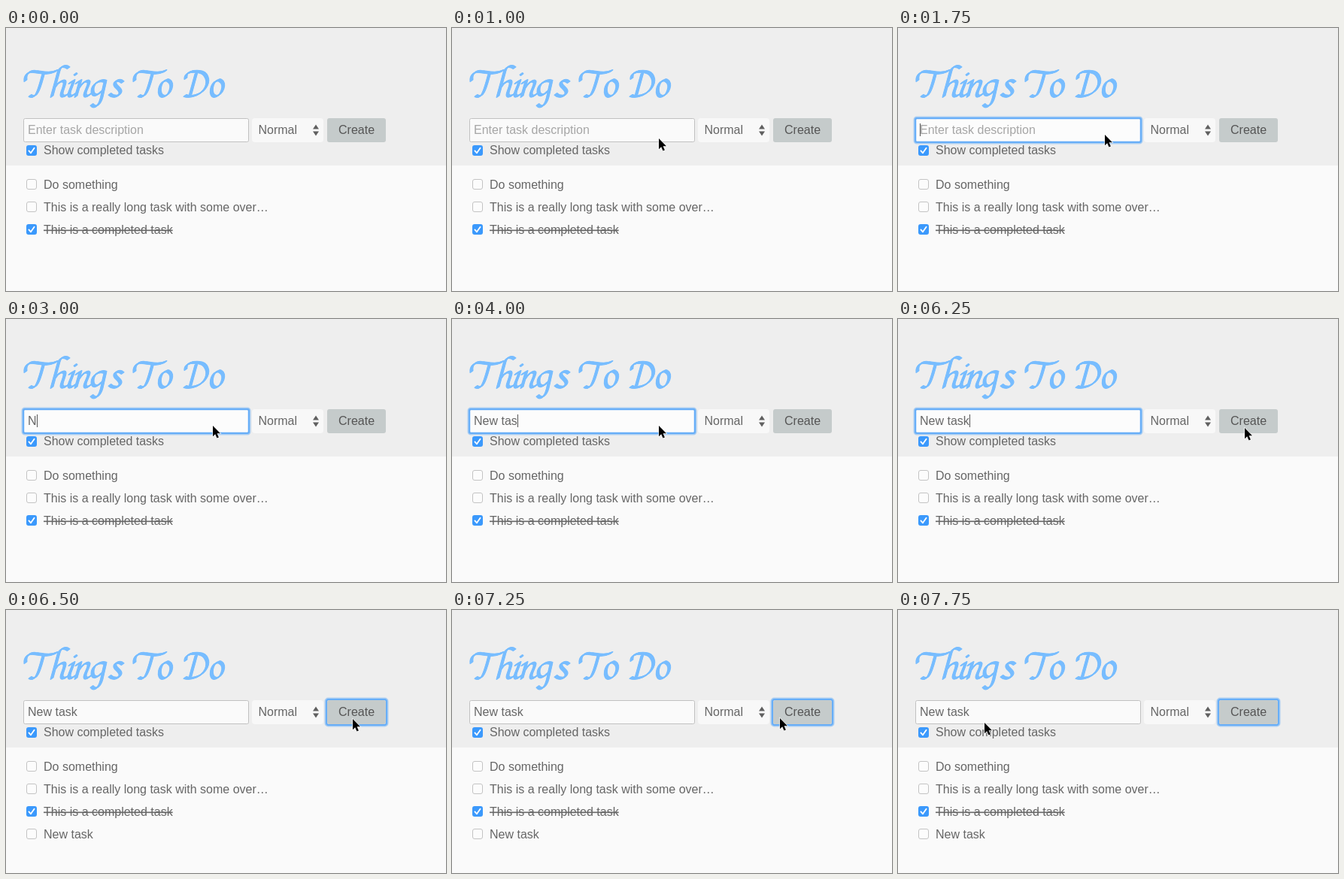
Animation, 585 px wide and 350 px high, one loop 8 s. Source, as an HTML page:

```html
<!DOCTYPE html>
<html lang="en">
<head>
<meta charset="utf-8">
<title>Things To Do</title>
<style>
  html, body { margin: 0; width: 100%; height: 100%; overflow: hidden; background: #fafafa; }
  svg { display: block; }
  text { font: 16px "Liberation Sans", Arial, sans-serif; fill: #666; white-space: pre; }
  .hint { fill: #a6a6a6; }
  .done { text-decoration: line-through; }
  .nib { fill: none; stroke: #78bdff; stroke-width: 1.4; stroke-linecap: round; stroke-linejoin: round; }
  .ring { fill: none; stroke: #67aef8; }
</style>
</head>
<body>
<svg id="stage" width="585" height="350" viewBox="0 0 585 350">
  <defs>
    <g id="box"><rect x=".5" y=".5" width="13" height="13" rx="2.5" fill="#fcfcfc" stroke="#c3c3c3"/></g>
    <g id="tick">
      <rect width="14" height="14" rx="3" fill="#3b99fc"/>
      <path d="M3.4 7.4 L6 10.3 L10.6 3.8" fill="none" stroke="#fff" stroke-width="1.8" stroke-linecap="round" stroke-linejoin="round"/>
    </g>
  </defs>
  <rect width="585" height="350" fill="#fafafa"/>
  <rect width="585" height="183" fill="#eee"/>
  <g id="heading" role="img" aria-label="Things To Do"></g>

  <rect id="field" x="23.5" y="120.5" width="299" height="31" rx="2" fill="#fafafa" stroke="#c1c1c1"/>
  <g id="fieldRing" class="ring">
    <rect x="22.5" y="119.5" width="301" height="33" rx="2.5" stroke-width="4" opacity=".5"/>
    <rect x="23" y="120" width="300" height="32" rx="2" stroke-width="2"/>
  </g>
  <text id="entry" x="29" y="141"></text>
  <rect id="caret" y="127" width="1" height="17" fill="#555"/>

  <rect x="327" y="120" width="95" height="32" rx="4" fill="#f8f8f8"/>
  <text x="335.5" y="141">Normal</text>
  <path d="M408 134.5 L412 128.5 L416 134.5 Z M408 137.5 L412 143.5 L416 137.5 Z" fill="#606060"/>

  <g id="buttonRing" class="ring">
    <rect x="425.5" y="118.5" width="81" height="35" rx="3" stroke-width="4" opacity=".5"/>
    <rect x="426" y="119" width="80" height="34" rx="3" stroke-width="2"/>
  </g>
  <rect x="427" y="120" width="78" height="32" rx="3" fill="#c5cbcb"/>
  <text x="442" y="141" style="fill:#555">Create</text>

  <use href="#tick" x="27" y="156"/>
  <text x="50" y="168">Show completed tasks</text>
  <g id="tasks"></g>
  <path id="pointer" d="M0 0 V14.2 L3.2 11.2 L5.5 16.6 L7.9 15.6 L5.6 10.3 H10 Z" fill="#000" stroke="#fff" stroke-width="1.2" paint-order="stroke"/>
</svg>
<script>
const $ = id => document.getElementById(id);

function add(parent, tag, attrs, text = "") {
  const el = document.createElementNS("http://www.w3.org/2000/svg", tag);
  for (const key in attrs) el.setAttribute(key, attrs[key]);
  el.textContent = text;
  return parent.appendChild(el);
}

// Script lettering: each skeleton is swept with a slanted broad nib.
const capT = "M26 70 C25 62 30 57 38 58 C48 59 56 62 67 57 M50 60 C47 70 45 80 41 87 C39 91 35 92 32 90";
const roundO = "M11 70 C3 71 0 90 8 91 C17 91 23 74 15 70 C14 69 12 69 11 70";
const letters = [
  [0, capT],
  [0, "M83 53 C78 49 72 51 70 58 L61 91 M64 80 C69 72 77 68 78 72 C79 75 74 84 74 88 C74 92 79 91 82 88"],
  [0, "M85 73 L90 70 C88 78 84 84 84 88 C84 92 88 91 91 88 M92 61 L93 62"],
  [0, "M94 73 L99 70 L93 91 M96 81 C101 73 108 68 110 72 C111 75 105 84 105 88 C105 92 109 91 112 88"],
  [0, "M132 71 C125 68 115 74 115 83 C115 91 121 91 127 84 M132 71 L127 93 C124 104 118 107 114 102"],
  [0, "M155 72 C150 68 144 70 145 75 C146 79 153 81 152 86 C150 92 142 92 138 88"],
  [145, capT],
  [201, roundO],
  [0, "M239 67 C238 59 247 57 256 58 C267 59 270 70 266 78 C261 88 248 93 238 90 M253 60 L245 89"],
  [270, roundO]
];
for (const [x, d] of letters)
  for (let k = -1; k <= 1; k += 0.25)
    add($("heading"), "path", { d, class: "nib", transform: `translate(${x + 1.8 * k} ${-1.3 * k})` });

const tasks = [
  ["Do something"],
  ["This is a really long task with some over…"],
  ["This is a completed task", true],
  ["New task"]
];
const rows = tasks.map(([label, done], i) => {
  const row = add($("tasks"), "g", { transform: `translate(0 ${201 + 30 * i})` });
  add(row, "use", { href: done ? "#tick" : "#box", x: 27 });
  add(row, "text", { x: 50, y: 13, class: done ? "done" : "" }, label);
  return row;
});

const LOOP = 8000, FOCUS = 1750, SUBMIT = 6500;

// Each table holds [start in ms, value]; values hold until the next step.
const pointer = [
  [0, null], [750, [319, 106]], [1000, [275, 147]], [FOCUS, [275, 142]],
  [5500, [323, 129]], [5750, [377, 140]], [6000, [451, 147]], [6250, [461, 145]],
  [7250, [436, 144]], [7500, [242, 122]], [7750, [115, 150]]
];
const typed = [
  [0, ""], [3000, "N"], [3500, "New"], [3750, "New "], [4000, "New tas"], [4250, "New task"]
];
const caretOn = [
  [0, false], [FOCUS, true], [2250, false], [3000, true], [4750, false],
  [5250, true], [5750, false], [6250, true], [SUBMIT, false]
];
const at = (steps, t) => steps.findLast(step => step[0] <= t)[1];
const show = (el, on) => el.setAttribute("visibility", on ? "visible" : "hidden");

const pen = document.createElement("canvas").getContext("2d");
pen.font = '16px "Liberation Sans", Arial, sans-serif';

function draw(t) {
  const text = at(typed, t), pos = at(pointer, t);
  const focused = t >= FOCUS && t < SUBMIT, sent = t >= SUBMIT;

  $("entry").textContent = text || "Enter task description";
  $("entry").setAttribute("class", text ? "" : "hint");
  $("caret").setAttribute("x", Math.round(29 + pen.measureText(text).width));
  $("field").setAttribute("fill", focused ? "#fcfcfc" : "#fafafa");
  show($("caret"), at(caretOn, t));
  show($("fieldRing"), focused);
  show($("buttonRing"), sent);
  show(rows[3], sent);
  show($("pointer"), pos);
  if (pos) $("pointer").setAttribute("transform", `translate(${pos})`);
}

const start = performance.now();
function tick() {
  draw((performance.now() - start) % LOOP);
  requestAnimationFrame(tick);
}
tick();
</script>
</body>
</html>
```
